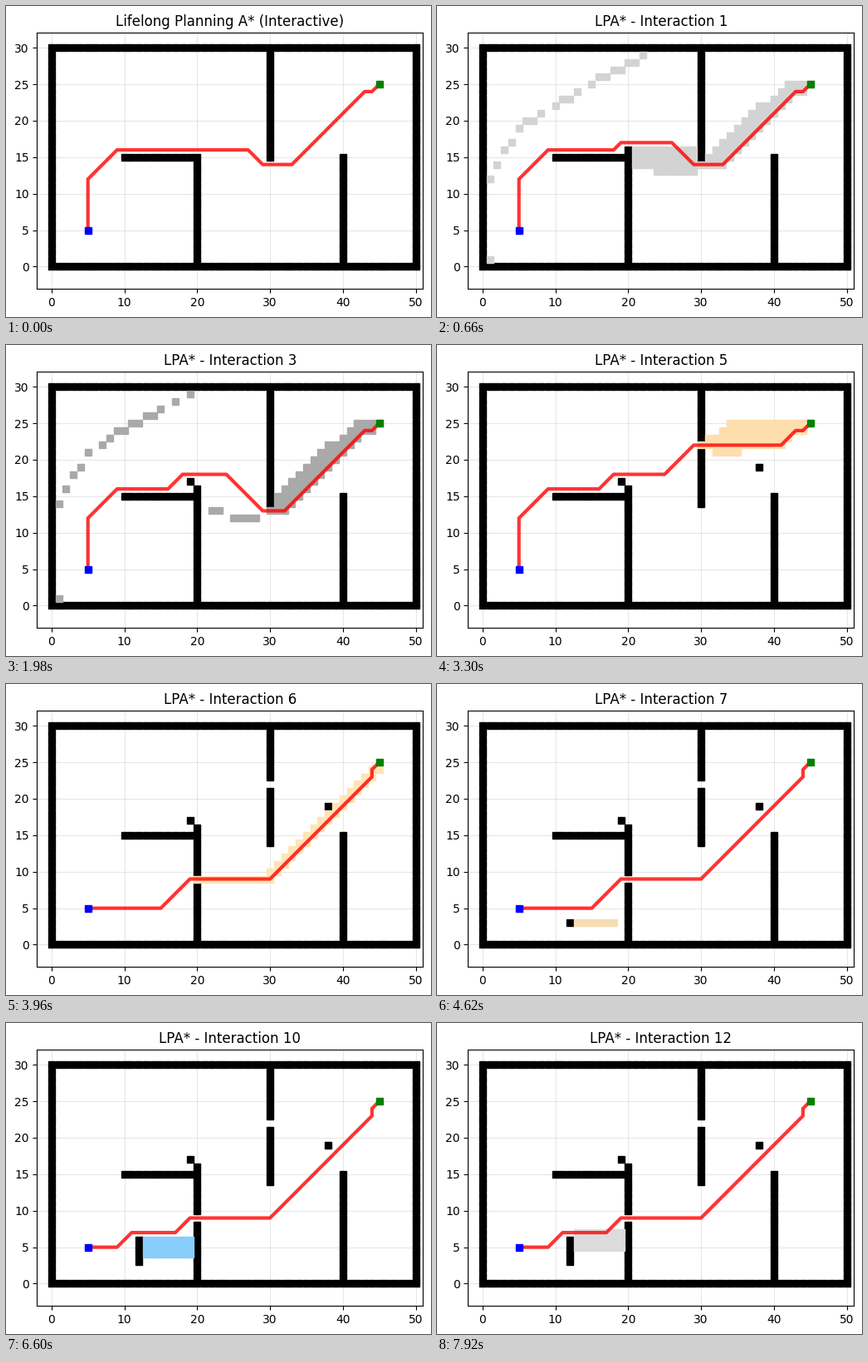
Write a matplotlib script that moves like this. It is 512 px wide and 374 px high and loops after 8000 ms.

```python
import matplotlib.pyplot as plt
from matplotlib.animation import FuncAnimation

W, H, DPI = 512, 374, 100
LOOP, STEP, HOLD = 8000, 40, 660
START, GOAL = (5, 5), (45, 25)


def block(x0, x1, y0, y1):
    return {(x, y) for x in range(x0, x1 + 1) for y in range(y0, y1 + 1)}


def arc(lift, gaps):
    """Broken frontier that climbs from the left wall to the top wall."""
    cells = set()
    for x in range(1, 23):
        y = round(min(13 + 1.825 * (x - 1), 20.3 + 0.56875 * (x - 5))) + lift
        if y < 30 and x not in gaps:
            cells.add((x, y))
    return cells


def band(first_row, offset, kink):
    """Slanted strip that ends at the goal."""
    cells = set()
    for y in range(first_row, 26):
        cells |= block(max(30, y + offset + y // kink), y + 19 + y // 24, y, y)
    return cells


def shelf(top):
    """Cells in the shadow of the low wall, whose highest cell is at top."""
    return block(13, min(19, 15 + top), max(3, top - 2), top)


def route(*stops):
    """Between stops, go straight first and then diagonally."""
    points = [START]
    for x1, y1 in stops + (GOAL,):
        x0, y0 = points[-1]
        dx, dy = x1 - x0, y1 - y0
        slant = min(abs(dx), abs(dy))
        if abs(dx) > abs(dy):
            points.append((x1 - slant * (1 if dx > 0 else -1), y0))
        else:
            points.append((x0, y1 - slant * (1 if dy > 0 else -1)))
        points.append((x1, y1))
    return points


room = block(20, 29, 14, 16) | block(24, 29, 13, 13)
ridge, bend = (9, 16), (18, 18)
door, turn = (19, 9), (44, 23)
last = (43, 24)

# Toggled cell, colour and set of re-expanded cells, path
steps = [
    (None, "white", set(), route(ridge, (29, 14), last)),
    ((20, 16), "lightgray", arc(-1, (9, 14)) | {(1, 1)} | room | band(14, 16, 23),
     route(ridge, (19, 17), (29, 14), last)),
    ((19, 17), "silver", arc(0, (9, 14)) | {(1, 2)} | room
     | block(20, 29, 17, 17) | band(14, 16, 23),
     route(ridge, bend, (29, 14), last)),
    ((30, 14), "darkgray", arc(1, (6, 16, 18)) | {(1, 1)}
     | block(22, 23, 13, 13) | block(25, 28, 12, 12) | band(13, 16, 23),
     route(ridge, bend, (29, 13), last)),
    ((38, 19), "bisque", arc(2, (6, 16, 18)) | {(45, 24)} | band(13, 16, 23),
     route(ridge, bend, (29, 13))),
    ((30, 22), "navajowhite", block(32, 35, 21, 21) | band(22, 8, 24),
     route(ridge, bend, (29, 22), last)),
    ((20, 9), "moccasin", block(20, 30, 9, 9)
     | {(y + d, y) for y in range(10, 25) for d in (20, 21)},
     route(door, turn)),
    ((12, 3), "wheat", shelf(3), route(door, turn)),
    ((12, 4), "powderblue", shelf(4), route(door, turn)),
    ((12, 5), "skyblue", shelf(5), route((11, 6), door, turn)),
    ((12, 6), "lightskyblue", shelf(6), route((11, 7), door, turn)),
    ((12, 7), "lightgray", shelf(7), route((8, 8), (11, 8), door, turn)),
    ((12, 7), "gainsboro", shelf(7), route((11, 7), door, turn)),
]

walls = (block(0, 50, 0, 30) - block(1, 49, 1, 29) | block(10, 20, 15, 15)
         | block(20, 20, 0, 15) | block(30, 30, 15, 30) | block(40, 40, 0, 15))
wall_states = []
for cell, *_ in steps:
    walls = walls ^ ({cell} if cell else set())
    wall_states.append(walls)

# Stage
fig = plt.figure(figsize=(W / DPI, H / DPI), dpi=DPI)
ax = fig.add_axes([37.3 / W, 33.75 / H, 465 / W, 308 / H])
half_height = 53 * 308 / 465 / 2
ax.set_xlim(-2, 51)
ax.set_ylim(14.5 - half_height, 14.5 + half_height)
ax.set_xticks(range(0, 51, 10))
ax.set_yticks(range(0, 31, 5))
ax.grid(True, alpha=0.3)
title = ax.set_title("")

wall_dots, = ax.plot([], [], "sk")
explored_dots, = ax.plot([], [], "s")
path_line, = ax.plot([], [], "-r", linewidth=3, alpha=0.8)
ax.plot(*START, "sb")
ax.plot(*GOAL, "sg")


def put(line, points):
    line.set_data([x for x, _ in points], [y for _, y in points])


def update(frame):
    k = min((frame * STEP + STEP // 2) // HOLD, len(steps) - 1)
    _, color, cells, path = steps[k]
    title.set_text(f"LPA* - Interaction {k}" if k
                   else "Lifelong Planning A* (Interactive)")
    put(wall_dots, sorted(wall_states[k]))
    put(explored_dots, sorted(cells - wall_states[k]))
    explored_dots.set_color(color)
    put(path_line, path)
    return title, wall_dots, explored_dots, path_line


anim = FuncAnimation(fig, update, frames=LOOP // STEP, interval=STEP,
                     repeat=True, repeat_delay=0)
plt.show()
```
